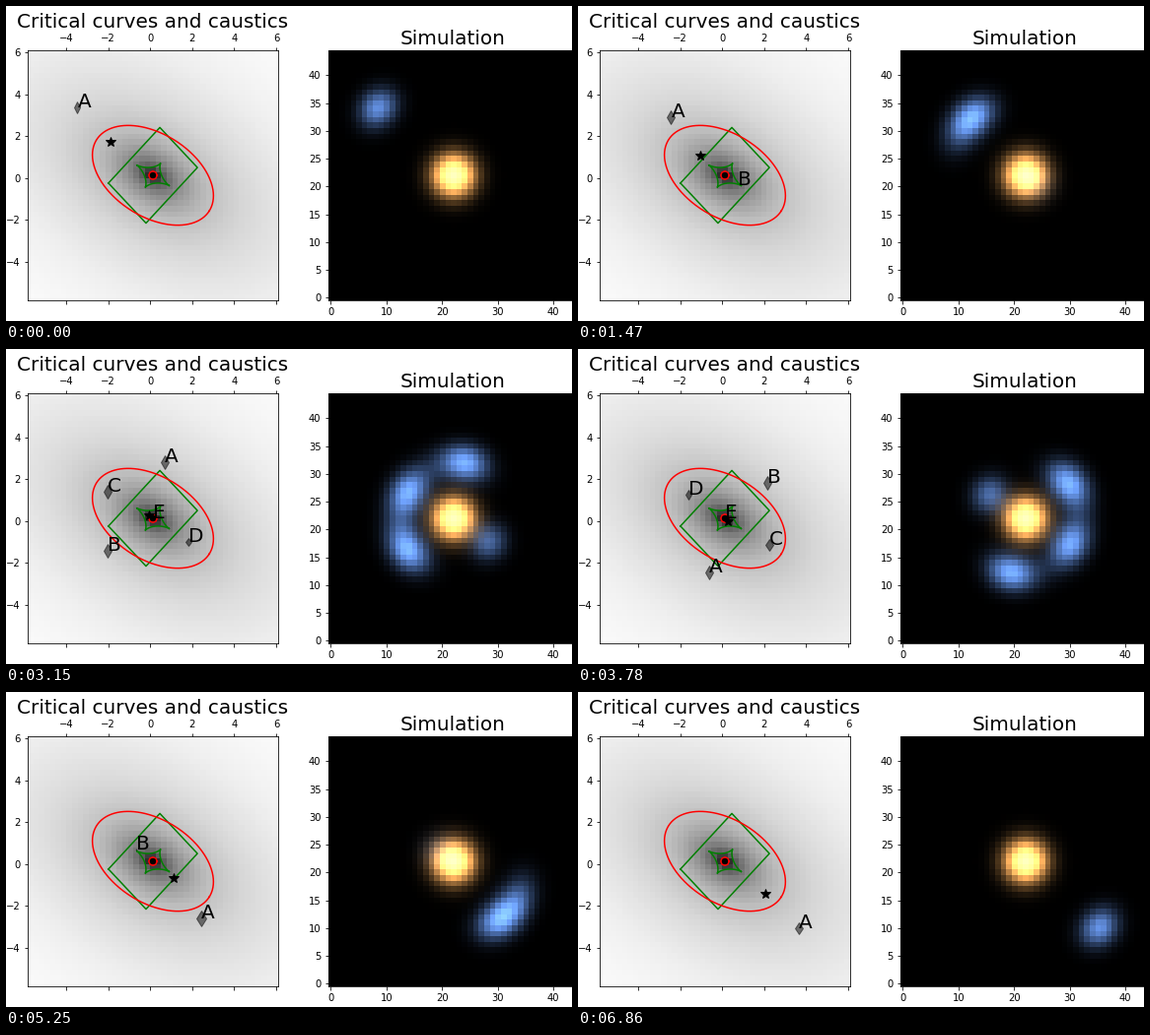
Write a matplotlib script that moves like this. It is 574 px wide and 320 px high and loops after 6.93 s.

```python
import numpy as np
import matplotlib.pyplot as plt
from matplotlib.animation import FuncAnimation

W, H, DPI = 574, 320, 72
FRAMES, STEP = 99, 70

# Singular isothermal ellipsoid seen by a 45 x 45 detector
N, PIX = 45, 0.265
MID = PIX / 2
HALF = N * PIX / 2
R_E, Q, TILT = 2.5, 0.62, np.radians(-32.4)
ECC = np.sqrt(1 - Q * Q)
SRC_SIGMA = 0.5 * PIX
PSF_SIGMA = 2.0
LENS_RGB = np.array([2.0, 1.4, 0.75])
SRC_RGB = 6.4 * np.array([0.44, 0.64, 1.0])


def rotate(x, y, angle):
    c, s = np.cos(angle), np.sin(angle)
    return c * x - s * y, s * x + c * y


def radius(u, v):
    return np.sqrt(Q * Q * u * u + v * v) + 1e-9


def kappa(x, y):
    return R_E * np.sqrt(Q) / (2 * radius(*rotate(x, y, -TILT)))


def deflect(x, y):
    u, v = rotate(x, y, -TILT)
    p = radius(u, v)
    k = R_E * np.sqrt(Q) / ECC
    return rotate(k * np.arctan(ECC * u / p), k * np.arctanh(ECC * v / p), TILT)


def to_source(x, y):
    ax, ay = deflect(x, y)
    return x - ax, y - ay


# The deflection depends on direction only, so images are roots in angle
PHI = np.linspace(0, 2 * np.pi, 4001) + 1e-4
COS, SIN = np.cos(PHI), np.sin(PHI)
DEF_X, DEF_Y = deflect(COS, SIN)


def find_images(bx, by):
    """Images as (x, y, magnification), first arrival first."""
    px, py = bx + DEF_X, by + DEF_Y
    cross = COS * py - SIN * px
    found = []
    for i in np.flatnonzero(cross[:-1] * cross[1:] < 0):
        t = cross[i] / (cross[i] - cross[i + 1])
        phi = PHI[i] + t * (PHI[i + 1] - PHI[i])
        c, s = np.cos(phi), np.sin(phi)
        ax, ay = deflect(c, s)
        r = c * (bx + ax) + s * (by + ay)
        if r < 0.15:
            continue
        x, y = r * c, r * s
        delay = (ax * ax + ay * ay) / 2 - (x * ax + y * ay)
        found.append((delay, x, y, 1 / abs(1 - 2 * kappa(x, y))))
    images = [f[1:] for f in sorted(found)]
    if np.hypot(bx, by) < 1:
        images.append((0, 0, 0))
    return images


def source_at(i):
    x = -2 + 0.04 * i
    return x, -0.8 * x


# Oversampled sky grid and the matrix that blurs and bins it
OVER = 5
pix = np.arange(N) - N // 2
sub = (np.arange(N * OVER) + 0.5) / OVER - N / 2
SKY_X, SKY_Y = to_source(*np.meshgrid(sub * PIX, sub * PIX))
BLUR = np.exp(-(pix[:, None] - sub) ** 2 / (2 * PSF_SIGMA ** 2))
BLUR /= OVER * PSF_SIGMA * np.sqrt(2 * np.pi)
LENS_LIGHT = np.exp(-(pix[:, None] ** 2 + pix ** 2) / 13.0)[..., None] * LENS_RGB


def simulate(bx, by):
    d2 = (SKY_X - bx) ** 2 + (SKY_Y - by) ** 2
    light = BLUR @ np.exp(-d2 / (2 * SRC_SIGMA ** 2)) @ BLUR.T
    return np.clip(LENS_LIGHT + light[..., None] * SRC_RGB, 0, 1)


def panel(x, y, size):
    return fig.add_axes([x / W, y / H, size / W, size / H])


def curve(x, y, color):
    left.plot(x + MID, y + MID, color=color, lw=1.5)


fig = plt.figure(figsize=(W / DPI, H / DPI), dpi=DPI, facecolor="white")
plt.rcParams["font.family"] = "DejaVu Sans"

left = panel(22, 21, 254)
gx, gy = np.meshgrid(pix * PIX, pix * PIX)
left.matshow(np.log10(kappa(gx, gy)), origin="lower", cmap="Greys", vmin=-1, vmax=1,
             extent=[MID - HALF, MID + HALF] * 2)
left.autoscale(False)
left.set_title("Critical curves and caustics", fontsize=20)

t = np.linspace(0, 2 * np.pi, 401)
crit = rotate(R_E / np.sqrt(Q) * np.cos(t), R_E * np.sqrt(Q) * np.sin(t), TILT)
quad = np.arange(5) * np.pi / 2
ring = np.arange(9) * np.pi / 4
curve(*to_source(*crit), "g")
curve(*to_source(0.27 * np.cos(quad), 0.27 * np.sin(quad)), "g")
curve(*crit, "r")
curve(0.2 * np.cos(ring), 0.2 * np.sin(ring), "r")

marks = [left.plot([], [], "dk", alpha=0.5)[0] for _ in range(5)]
names = [left.text(0, 0, c, fontsize=20, color="k") for c in "ABCDE"]
star, = left.plot([], [], "*k", markersize=10)

right = panel(326.5, 21, 254)
view = right.imshow(np.zeros((N, N, 3)), origin="lower", interpolation="nearest")
right.set_title("Simulation", fontsize=20)


def update(i):
    bx, by = source_at(i)
    images = find_images(bx, by)
    for k, (mark, name) in enumerate(zip(marks, names)):
        shown = k < len(images)
        mark.set_visible(shown)
        name.set_visible(shown)
        if shown:
            x, y, mag = images[k]
            mark.set_data([x + MID], [y + MID])
            mark.set_markersize(max(0, 4 * (1 + np.log(mag + 1e-9))))
            name.set_position((x + MID, y + MID))
    star.set_data([bx + MID], [by + MID])
    view.set_data(simulate(bx, by))
    return [*marks, *names, star, view]


anim = FuncAnimation(fig, update, frames=FRAMES, interval=STEP, repeat=True, repeat_delay=0)
plt.show()
```
